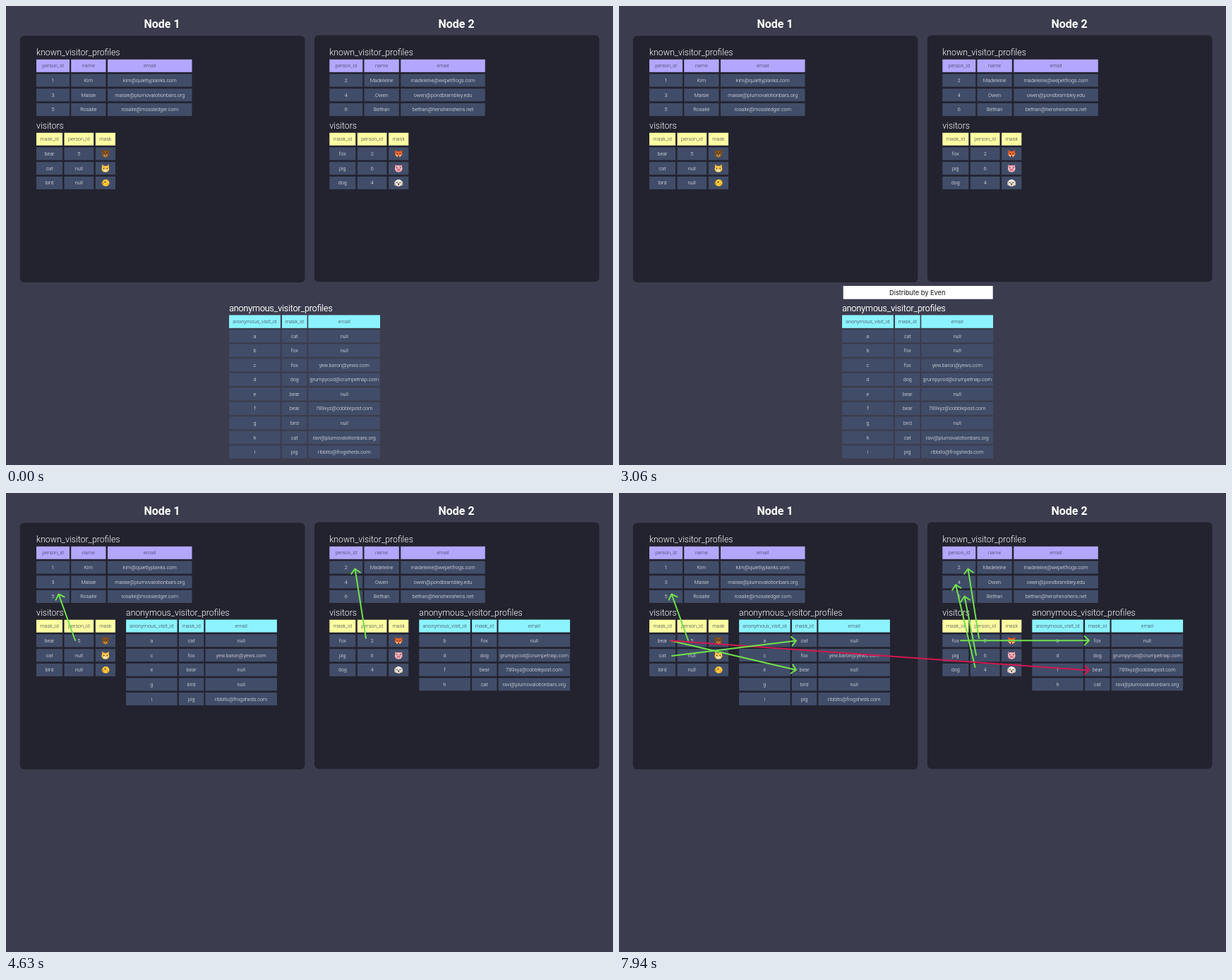
Animation of 860 by 651 pixels, one loop 8 s. Source, as an HTML page with a canvas:

```html
<!DOCTYPE html>
<html lang="en">
<head>
<meta charset="utf-8">
<title>Distributing tables over two nodes</title>
<style>
  html, body { margin: 0; width: 100%; height: 100%; overflow: hidden; background: #3b3d4e; }
  canvas { display: block; width: 860px; height: 651px; }
</style>
</head>
<body>
<canvas id="stage"></canvas>
<script>
const W = 860, H = 651, LOOP = 8000, STEP = 62.5, FADE = 300;
const SHOW_BAR = 2018, SPLIT = 3118, BEAT = 1100;
const PITCH = 20.7, CELL_H = 18;
const GREEN = '#72e24b', RED = '#d4174f';
const canvas = document.getElementById('stage');
const ctx = canvas.getContext('2d');
const ratio = window.devicePixelRatio || 1;
canvas.width = W * ratio;
canvas.height = H * ratio;

// Columns are [left, width] relative to the table's left edge.
const PEOPLE = { title: 'known_visitor_profiles', color: '#b3a6fd',
  heads: ['person_id', 'name', 'email'], cols: [[0, 47], [49.2, 49.3], [101, 119.5]] };
const VISITORS = { title: 'visitors', color: '#fcfda2',
  heads: ['mask_id', 'person_id', 'mask'], cols: [[0, 37], [39.5, 41.7], [83.8, 28.2]] };
const VISITS = { title: 'anonymous_visitor_profiles', color: '#8cf3fe',
  heads: ['anonymous_visit_id', 'mask_id', 'email'], cols: [[0, 72.5], [74.8, 35.4], [112.3, 101.5]] };

const people = [
  [['1', 'Kim', 'kim@quietlyplanks.com'],
   ['3', 'Maisie', 'maisie@plumovalotionbars.org'],
   ['5', 'Rosalie', 'rosalie@mossledger.com']],
  [['2', 'Madeleine', 'madeleine@wepetfrogs.com'],
   ['4', 'Owen', 'owen@pondbrambley.edu'],
   ['6', 'Bethan', 'bethan@henshenshens.net']]
];
const visitors = [
  [['bear', '5', bear], ['cat', 'null', cat], ['bird', 'null', bird]],
  [['fox', '2', fox], ['pig', '6', pig], ['dog', '4', dog]]
];
const visits = [
  ['a', 'cat', 'null'], ['b', 'fox', 'null'], ['c', 'fox', 'yew.baron@yews.com'],
  ['d', 'dog', 'grumpycod@crumpetnap.com'], ['e', 'bear', 'null'],
  ['f', 'bear', '789xyz@cobblepost.com'], ['g', 'bird', 'null'],
  ['h', 'cat', 'ravi@plumovalotionbars.org'], ['i', 'pig', 'ribbito@frogsheds.com']
];

// Each beat after the split adds a pair of arrows: [x1, y1, x2, y2, color].
const arrowPairs = [
  [[98, 209, 74.5, 143.5, GREEN], [510, 206, 494.5, 107.5, GREEN]],
  [[73.5, 209.5, 251, 251, GREEN], [506, 230, 489.5, 146.5, GREEN]],
  [[504.5, 247, 477, 130, GREEN], [73.5, 209.5, 666, 251.5, RED]],
  [[75, 231, 251, 209.5, GREEN], [484, 209.3, 666, 209.3, GREEN]]
];

const lerp = (a, b, p) => a + (b - a) * p;

// cubic-bezier(0, 0, .58, 1), solved by bisection
function easeOut(x) {
  if (x <= 0) return 0;
  if (x >= 1) return 1;
  let lo = 0, hi = 1;
  for (let i = 0; i < 20; i++) {
    const s = (lo + hi) / 2;
    if (1.74 * (1 - s) * s * s + s * s * s < x) lo = s; else hi = s;
  }
  return 3 * (1 - lo) * lo * lo + lo * lo * lo;
}
const progress = (t, start) => easeOut((t - start) / FADE);

function text(str, x, y, size, color, align = 'center', weight = 300, family = 'Roboto') {
  ctx.font = `${weight} ${size}px ${family}, sans-serif`;
  ctx.textAlign = align;
  ctx.fillStyle = color;
  ctx.fillText(str, x, y + size * 0.345);
}

function panel(x, y) {
  ctx.fillStyle = '#23232f';
  ctx.beginPath();
  ctx.roundRect(x, y, 403.6, 349.7, 6);
  ctx.fill();
}

function row(table, x, y, values, fill, ink) {
  table.cols.forEach(([left, width], i) => {
    ctx.fillStyle = fill;
    ctx.fillRect(x + left, y - CELL_H / 2, width, CELL_H);
    const mid = x + left + width / 2, value = values[i];
    if (typeof value === 'function') value(mid, y);
    else text(value, mid, y, 7.25, ink);
  });
}

// y is the middle of the header; rowY gives each row's distance below it.
function drawTable(table, x, y, rows, rowY = i => (i + 1) * PITCH) {
  text(table.title, x, y - 19.2, 12.3, '#fff', 'left');
  rows.forEach((values, i) => row(table, x, y + rowY(i), values, '#414d68', '#f3f4f8'));
  row(table, x, y, table.heads, table.color, '#3b3d4e');
}

function dot(x, y, rx, color, ry = rx) {
  ctx.fillStyle = color;
  ctx.beginPath();
  ctx.ellipse(x, y, rx, ry, 0, 0, Math.PI * 2);
  ctx.fill();
}
function poly(color, ...pts) {
  ctx.fillStyle = color;
  ctx.beginPath();
  for (let i = 0; i < pts.length; i += 2) ctx.lineTo(pts[i], pts[i + 1]);
  ctx.fill();
}
function eyes(x, y, gap = 2) {
  dot(x - gap, y, 0.75, '#2a1c18');
  dot(x + gap, y, 0.75, '#2a1c18');
}
function pointedEars(x, y, color) {
  poly(color, x - 5, y - 5.5, x - 0.8, y - 3, x - 5, y + 1);
  poly(color, x + 5, y - 5.5, x + 0.8, y - 3, x + 5, y + 1);
}
function bear(x, y) {
  for (const s of [-1, 1]) {
    dot(x + s * 3.9, y - 3.4, 2, '#85551f');
    dot(x + s * 3.9, y - 3.4, 1, '#4b2d16');
  }
  dot(x, y + 0.5, 5.1, '#85551f', 4.9);
  dot(x, y + 2.4, 2.6, '#c8964f', 2.1);
  eyes(x, y - 0.7);
  dot(x, y + 1.6, 1.1, '#2a1c18', 0.8);
}
function cat(x, y) {
  pointedEars(x, y, '#f2b33a');
  dot(x, y + 1, 5.4, '#f8c54a', 4.5);
  dot(x, y + 3, 2.7, '#fdf0cf', 1.8);
  eyes(x, y + 0.4, 2.3);
  dot(x, y + 2.2, 0.7, '#df7f75', 0.5);
}
function bird(x, y) {
  dot(x + 0.4, y, 5.2, '#fbc93c', 4.9);
  poly('#f08a24', x - 6, y + 1, x - 2.6, y - 0.8, x - 2.3, y + 2.4);
  dot(x - 0.4, y - 1.2, 0.9, '#2a1c18');
  dot(x + 3, y + 2, 1.7, '#eca628', 1.2);
}
function fox(x, y) {
  pointedEars(x, y, '#d9511f');
  poly('#e8692c', x - 5.6, y + 0.5, x - 3, y - 3.2, x + 3, y - 3.2, x + 5.6, y + 0.5, x + 2, y + 4.8, x - 2, y + 4.8);
  poly('#fae5cf', x - 4.8, y + 1.6, x - 1, y + 2.2, x - 1.5, y + 4.6);
  poly('#fae5cf', x + 4.8, y + 1.6, x + 1, y + 2.2, x + 1.5, y + 4.6);
  eyes(x, y + 0.2);
  dot(x, y + 3.8, 1, '#2a1c18', 0.8);
}
function pig(x, y) {
  pointedEars(x, y, '#d97f91');
  dot(x, y + 0.6, 5.3, '#f5b3bd', 4.9);
  dot(x, y + 2, 2.6, '#e68799', 1.9);
  eyes(x, y - 1, 2.5);
  dot(x - 0.9, y + 2, 0.5, '#80404e', 0.8);
  dot(x + 0.9, y + 2, 0.5, '#80404e', 0.8);
}
function dog(x, y) {
  dot(x, y, 4.8, '#f5efe4', 5);
  dot(x - 4.4, y + 0.6, 1.5, '#d9cdba', 3.2);
  dot(x + 4.4, y + 0.6, 1.5, '#d9cdba', 3.2);
  eyes(x, y - 0.5);
  dot(x, y + 1.7, 1.3, '#2a1c18', 0.9);
  dot(x, y + 3.7, 0.8, '#d8707a', 0.9);
}

function arrow([x1, y1, x2, y2, color]) {
  const back = Math.atan2(y1 - y2, x1 - x2), wing = 9;
  ctx.strokeStyle = color;
  ctx.lineWidth = 2;
  ctx.lineCap = 'round';
  ctx.beginPath();
  ctx.moveTo(x1, y1);
  ctx.lineTo(x2, y2);
  for (const turn of [-Math.PI / 4, Math.PI / 4]) {
    ctx.moveTo(x2, y2);
    ctx.lineTo(x2 + wing * Math.cos(back + turn), y2 + wing * Math.sin(back + turn));
  }
  ctx.stroke();
}

// Alternate rows go to each node while the gaps between them close.
function drawSplit(node, p) {
  const rows = visits.filter((_, i) => i % 2 === node);
  const x = lerp(316.2, node ? 585.3 : 170.1, p);
  const y = lerp(447.6, 188.6, p);
  drawTable(VISITS, x, y, rows, i => lerp((2 * i + node + 1) * 20.55, (i + 1) * PITCH, p));
}

function draw(t) {
  ctx.setTransform(ratio, 0, 0, ratio, 0, 0);
  ctx.globalAlpha = 1;
  ctx.fillStyle = '#3b3d4e';
  ctx.fillRect(0, 0, W, H);
  panel(19.8, 42.3);
  panel(436.9, 41.5);
  text('Node 1', 221, 25, 16, '#fff', 'center', 700);
  text('Node 2', 638, 25, 16, '#fff', 'center', 700);

  [43, 458.3].forEach((x, node) => {
    drawTable(PEOPLE, x, 84.8, people[node]);
    drawTable(VISITORS, x, 188.8, visitors[node]);
  });

  const split = progress(t, SPLIT);
  drawSplit(0, split);
  drawSplit(1, split);

  ctx.globalAlpha = progress(t, SHOW_BAR) * (1 - split);
  ctx.fillStyle = '#fff';
  ctx.fillRect(317.7, 397, 212, 18.7);
  text('Distribute by Even', 422.7, 406.8, 9.25, '#111', 'center', 400, 'Inter');

  arrowPairs.forEach((pair, i) => {
    ctx.globalAlpha = progress(t, SPLIT + BEAT * (i + 1));
    pair.forEach(arrow);
  });
}

function tick(now) {
  const t = now % LOOP;
  draw(Math.floor((t + 2.5) / STEP) * STEP);
  requestAnimationFrame(tick);
}
requestAnimationFrame(tick);
</script>
</body>
</html>
```
